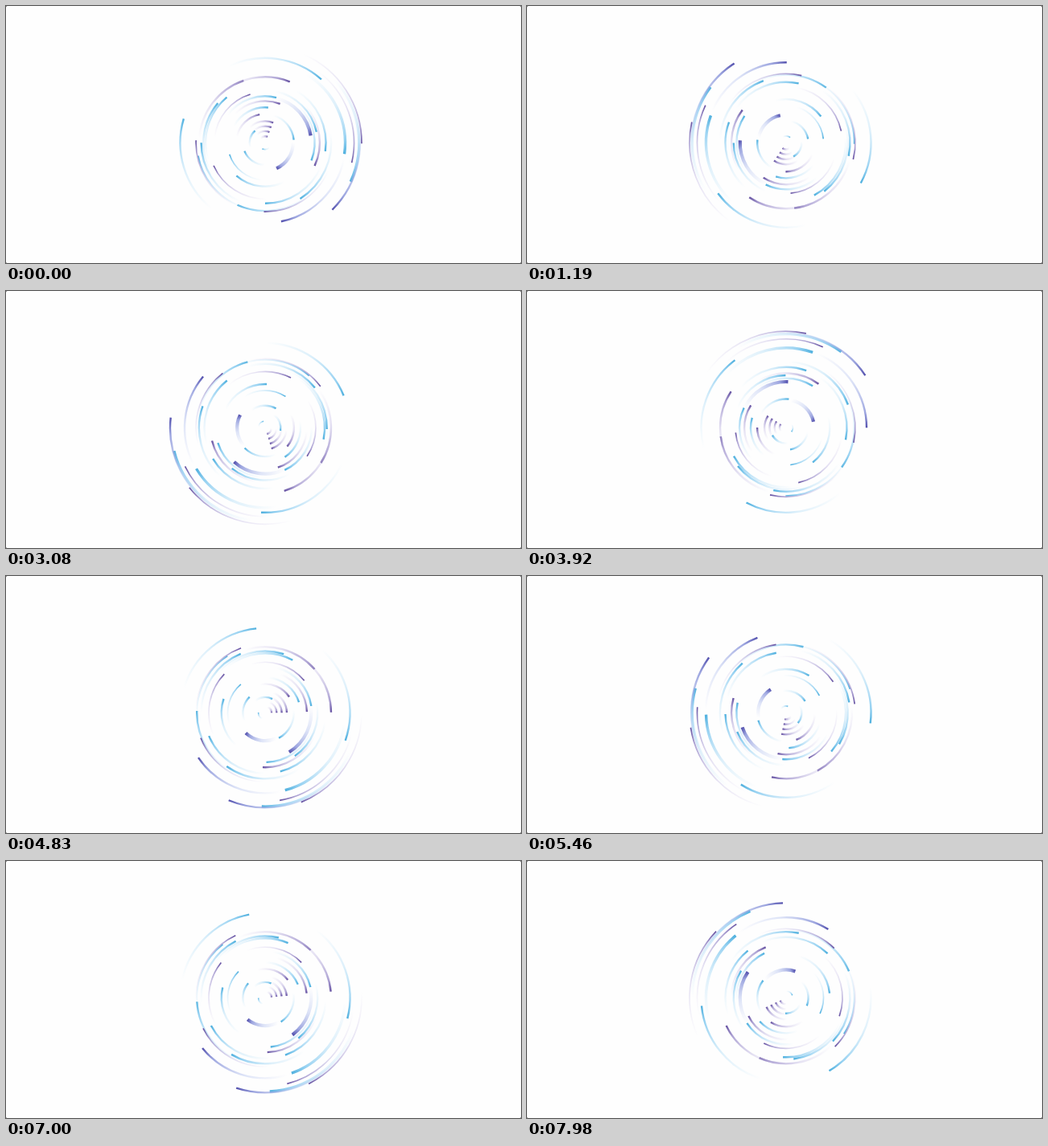
These frames come from a looping animation (640 px wide and 320 px high, 8 s). An HTML page:

```html
<!DOCTYPE html>
<html lang="en">
<head>
<meta charset="utf-8">
<title>Rotating arcs</title>
<style>
  html, body { margin: 0; width: 100%; height: 100%; overflow: hidden; background: #333; }
  svg { display: block; width: 100vw; height: 100vh; }
</style>
</head>
<body>
<svg viewBox="0 0 640 320">
  <rect width="640" height="320" rx="1.6" fill="#fefefe"/>
  <defs></defs>
  <g id="spin" fill="none"></g>
</svg>
<script>
const NS = 'http://www.w3.org/2000/svg';
const CX = 322, CY = 170.3, SWEEP = 67;
const LOOP = 8000, STEP = 70, TURN = 2200;
const THIN = 1.7, MID = 2.4, WIDE = 3.4, BOLD = 4.2;
const BLUE = { head: '#4fb0de', body: '#7cc6ee', tail: '#bfe3f8' };
const PURPLE = { head: '#6652a2', body: '#9b8eca', tail: '#cfc8e9' };
const INDIGO = { head: '#5451ae', body: '#8590d8', tail: '#bfcbf1' };

const defs = document.querySelector('defs');
const spin = document.getElementById('spin');
const rad = deg => deg * Math.PI / 180;

function add(parent, name, attrs) {
  const el = document.createElementNS(NS, name);
  for (const key in attrs) el.setAttribute(key, attrs[key]);
  return parent.appendChild(el);
}

function point(r, deg) {
  return [CX + r * Math.cos(rad(deg)), CY + r * Math.sin(rad(deg))];
}

function arc(tint, width, r, head) {
  const [x1, y1] = point(r, head - SWEEP);
  const [x2, y2] = point(r, head);
  const id = 'fade' + spin.childElementCount;
  const fade = add(defs, 'linearGradient', { id, gradientUnits: 'userSpaceOnUse', x1, y1, x2, y2 });
  const stop = (offset, color, opacity) =>
    add(fade, 'stop', { offset, 'stop-color': color, 'stop-opacity': opacity });
  stop(0, tint.tail, 0);
  stop(0.45, tint.tail, 0.5);
  stop(0.85, tint.body, 0.8);
  stop(1, tint.head, 1);
  add(spin, 'path', {
    d: `M${x1} ${y1}A${r} ${r} 0 0 1 ${x2} ${y2}`,
    stroke: `url(#${id})`,
    'stroke-width': width
  });
}

// Evenly spaced radii, one arc per head angle; a zero gap shares one circle.
function rings(tint, width, r, gap, ...heads) {
  heads.forEach((head, i) => arc(tint, width, r + gap * i, head));
}

rings(BLUE, WIDE, 99.5, 17.3, 8, 24.5);
rings(BLUE, MID, 105.5, 0, 196.5, 311.5);
rings(BLUE, MID, 74, 2.7, 230, 220, 180, 58, 114);
rings(BLUE, MID, 75.5, 0, 8, 90);
rings(BLUE, MID, 54.3, 3.65, 131, -76, 21, -12);
rings(BLUE, MID, 19.4, 8.2, 230, 158, -6, -85);
rings(BLUE, THIN, 8.3, 38.2, 115, 162, 169);
rings(INDIGO, BOLD, 34.8, 22.5, 66, -9);
rings(INDIGO, MID, 100, 18, 78.5, 45);
rings(PURPLE, MID, 82, 0, -109, -68);
rings(PURPLE, MID, 35.9, 16, -101, -69, 25);
rings(PURPLE, MID, 8, 6.3, ...Array(4).fill(-68));
rings(PURPLE, THIN, 63, 7, 253, 156);
rings(PURPLE, THIN, 85.9, 0, 182, 91);
rings(PURPLE, THIN, 110.5, 9.5, 13, 0.5);

// A steady turn that falls slightly behind on one side and catches up again.
function angleAt(ms) {
  const even = ms / TURN * 360;
  const lag = 1.4 + 1.4 * Math.tanh(6 * (Math.cos(rad(even - 145)) + 0.2));
  return even - lag;
}

function render(ms) {
  const held = Math.floor(ms % LOOP / STEP) * STEP;
  spin.setAttribute('transform', `rotate(${angleAt(held)} ${CX} ${CY})`);
}

const start = performance.now();
function tick() {
  render(performance.now() - start);
  requestAnimationFrame(tick);
}
render(0);
requestAnimationFrame(tick);
</script>
</body>
</html>
```
